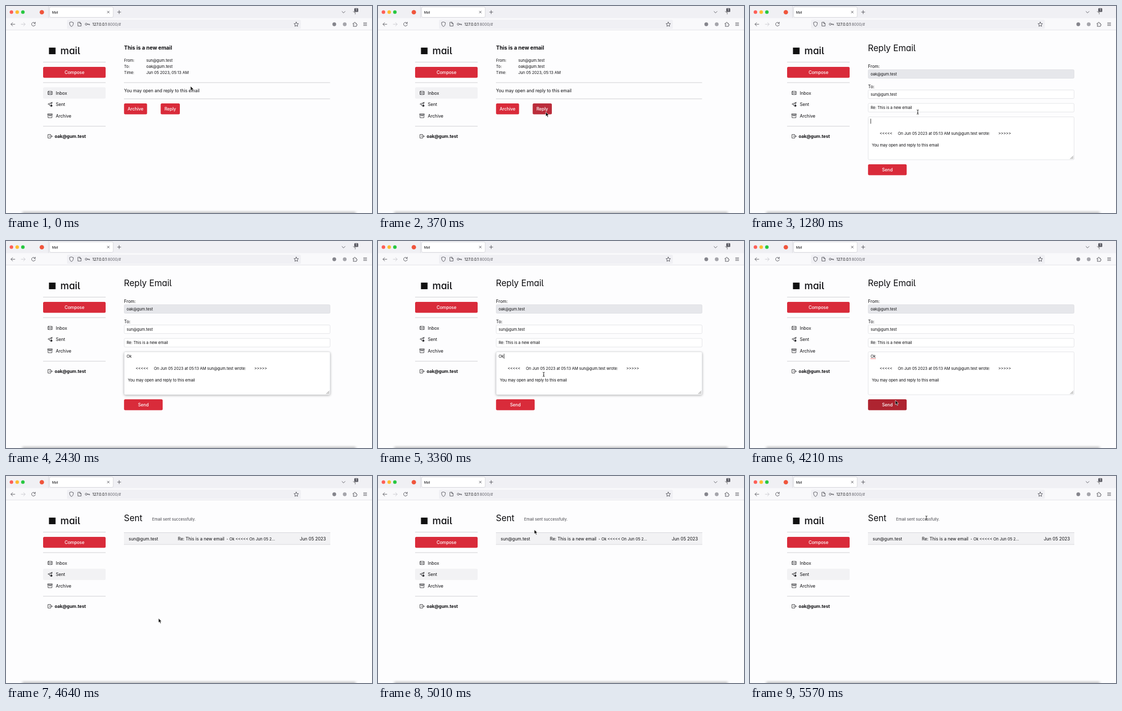
An HTML page for the animation above (5.59 s loop, 720 by 408 pixels).

```html
<!DOCTYPE html>
<html lang="en">
<head>
<meta charset="utf-8">
<title>Mail</title>
<style>
  html, body { margin: 0; width: 100%; height: 100%; overflow: hidden; background: #fdfdfe; }
  svg { display: block; width: 100vw; height: 100vh; }
  text { font: 400 8.55px Inter, sans-serif; fill: #0c0c0f; white-space: pre; }
  .small { font-size: 7.6px; }
  .bold { font-weight: 700; }
  .heading { font-size: 17px; font-feature-settings: "cv11", "cv05"; }
  .logo { font-size: 19px; font-weight: 500; font-feature-settings: "cv11", "cv05"; }
  .label { fill: #fff; font-weight: 500; text-anchor: middle; }
  .button { fill: #d92b3a; }
  .rule { stroke: #cdcdd1; fill: none; }
  .icon { stroke: #4a4a52; fill: none; stroke-width: .9; stroke-linecap: round; stroke-linejoin: round; }
  .dark { stroke: #17171b; stroke-width: .8; }
  .field { fill: #fff; stroke: #dcdde1; stroke-width: .8; }
  .selected { fill: #f2f2f4; }
</style>
</head>
<body>
<svg viewBox="0 0 720 408">
  <defs>
    <filter id="blur" x="-10%" y="-50%" width="120%" height="200%"><feGaussianBlur stdDeviation="2.8"/></filter>
  </defs>
  <rect width="720" height="408" fill="#fdfdfe"/>

  <!-- Browser window -->
  <rect width="720" height="24" fill="#f0f0f4"/>
  <rect y="24" width="720" height="23" fill="#f9f9fb"/>
  <path d="M0 47.3H720" stroke="#dedee2" stroke-width=".8"/>
  <circle cx="10.7" cy="12" r="3.5" fill="#fe5f57"/>
  <circle cx="22" cy="12" r="3.5" fill="#febc2e"/>
  <circle cx="33.2" cy="12" r="3.5" fill="#28c840"/>
  <circle cx="70.5" cy="12.2" r="4.3" fill="#f0553c"/>
  <path d="M83.5 0V23.5" stroke="#d5d5da" stroke-width=".7"/>
  <rect x="85.7" y="1.8" width="125.2" height="20.6" rx="2.5" fill="#fff" stroke="#c9c9d0" stroke-width=".7"/>
  <text x="90.5" y="14.6" style="font-size:6.2px">Mail</text>
  <rect x="120" y="27" width="460" height="18" rx="2.5" fill="#f0f0f4"/>
  <g class="icon">
    <path d="M199.3 10l4 4m0-4l-4 4M219.3 12h6.6m-3.3-3.3v6.6M661 10.7l3 3 3-3"/>
    <path d="M17.5 36H9.8m3.2-3.3L9.7 36l3.3 3.3"/>
    <path d="M30 36h7.7m-3.2-3.3l3.3 3.3-3.3 3.3" stroke="#c4c4ca"/>
    <path d="M57.2 33.8a3.7 3.7 0 1 0 .5 3M57.6 31.8v2.6H55"/>
    <path d="M128.8 31.5l3.7 1.3c0 4-.8 6.2-3.7 7.7-2.9-1.5-3.7-3.7-3.7-7.7z"/>
    <path d="M141.8 32h3.6l2.4 2.4v5.1h-6zM145.2 32v2.6h2.6"/>
    <circle cx="157.8" cy="35.8" r="2"/><path d="M160 35.8h4.4v1.8m-2-1.8v1.3"/>
    <path d="M571 31.7l1.3 2.8 3.1.4-2.3 2.1.6 3.1-2.7-1.5-2.7 1.5.6-3.1-2.3-2.1 3.1-.4z"/>
    <path d="M683.2 34h1.8c-.7-2.6 3-2.6 2.3 0h2v2.2c2.3-.6 2.3 2.6 0 2v2h-6.1v-2c2 .4 2-2.5 0-2z"/>
    <path d="M703.3 33.2h6.4m-6.4 2.6h6.4m-6.4 2.6h6.4"/>
    <path d="M683 10.5q1 2.5 4 2v3.5" stroke="#666"/>
  </g>
  <circle cx="645.8" cy="36" r="3.7" fill="#85858c"/>
  <circle cx="666.3" cy="36" r="3.7" fill="#a5a5ab"/>
  <rect x="685" y="4.2" width="8" height="7.6" rx="1.5" fill="#606068"/>
  <text x="689" y="10.2" text-anchor="middle" style="font-size:6px;fill:#fff">1</text>
  <text x="170" y="38.8" style="font-size:7.4px">127.0.0.1<tspan fill="#62626a">:8000/#</tspan></text>

  <!-- Sidebar -->
  <rect x="84.5" y="82" width="13" height="13" fill="#111"/>
  <text class="logo" x="107" y="94.5">mail</text>
  <path class="rule" d="M73 110.7H196M73 151H196M73 237H196"/>
  <rect class="button" x="73" y="120" width="123" height="21.5" rx="2.5"/>
  <text class="label" x="134.7" y="134">Compose</text>
  <rect id="selection" class="selected" x="73" y="160.3" width="123" height="22.2" rx="2.5"/>
  <text x="98" y="174.6">Inbox</text>
  <text x="98" y="197.2">Sent</text>
  <text x="98" y="219.7">Archive</text>
  <text class="bold" x="95.7" y="259.8">oak@gum.test</text>
  <g class="icon dark">
    <rect x="82.5" y="168.2" width="8.4" height="6.4" rx="1"/>
    <path d="M82.7 169.3l4 2.6 4-2.6M82.8 174.2l2.8-2.8m5 2.8l-2.8-2.8"/>
    <path d="M87 197.2l-1.5-2.5-2.9-1.4 8.3-3.5-1.5 4.3M85.5 194.7l5.1-4.7"/>
    <circle cx="89.3" cy="196.6" r="1.5" fill="#17171b"/>
    <path d="M82.4 212.5h8.6v2.2h-8.6zM83.1 214.7h7.2v5.5h-7.2zM85.5 216.5h2.4"/>
    <path d="M88 255v-1.7h-5.5v7H88v-1.7M85.3 256.8h5.6m-1.7-1.7l1.7 1.7-1.7 1.7"/>
  </g>

  <!-- Opened email -->
  <g id="reading">
    <text class="bold" x="232.3" y="85.6" style="font-size:10.3px">This is a new email</text>
    <g class="small">
      <text class="small" x="232.3" y="110.3">From:</text><text class="small" x="276" y="110.3">sun@gum.test</text>
      <text class="small" x="232.3" y="122.2">To:</text><text class="small" x="276" y="122.2">oak@gum.test</text>
      <text class="small" x="232.3" y="134.2">Time:</text><text class="small" x="276" y="134.2">Jun 05 2023, 05:13 AM</text>
    </g>
    <path class="rule" d="M232 151H637.5M232 183H637.5"/>
    <text x="232.3" y="170">You may open and reply to this email</text>
    <rect class="button" x="232.2" y="192" width="45.3" height="21.5" rx="2.5"/>
    <text class="label" x="254.8" y="206">Archive</text>
    <rect id="reply" class="button" x="304.3" y="192" width="37.7" height="21.5" rx="2.5"/>
    <text class="label" x="323.1" y="206">Reply</text>
  </g>

  <!-- Reply form -->
  <g id="writing">
    <text class="heading" x="232" y="89.3">Reply Email</text>
    <text x="232.3" y="121.6">From:</text>
    <rect class="field" x="232.5" y="125.5" width="405" height="17" rx="2" style="fill:#e6e7eb"/>
    <text class="small" x="237.2" y="136.8">oak@gum.test</text>
    <text x="232.3" y="161.6">To:</text>
    <rect class="field" x="232.5" y="165.5" width="405" height="17" rx="2"/>
    <text class="small" x="237.2" y="176.8">sun@gum.test</text>
    <rect class="field" x="232.5" y="192" width="405" height="17" rx="2"/>
    <text class="small" x="237.2" y="203.3">Re: This is a new email</text>
    <rect id="glow" x="232.5" y="220" width="405" height="84" rx="2" opacity="0" filter="url(#blur)"/>
    <rect class="field" x="232.5" y="218.5" width="405" height="84.5" rx="2"/>
    <text id="typed" class="small" x="237.2" y="229.9"></text>
    <path id="squiggle" d="M237.5 231.8H248" stroke="#d33" stroke-width="1.2" stroke-dasharray="1.2 .9"/>
    <path id="caret" stroke="#000" stroke-width=".8"/>
    <text class="small" x="255" y="253.6">&lt;&lt;&lt;&lt;&lt;</text>
    <text class="small" x="291" y="253.6">On Jun 05 2023 at 05:13 AM sun@gum.test wrote:</text>
    <text class="small" x="488.5" y="253.6">&gt;&gt;&gt;&gt;&gt;</text>
    <text class="small" x="239.7" y="277.2">You may open and reply to this email</text>
    <path d="M630 301.5l6-6m-3.4 6l3.4-3.4m-1 3.4l1-1" stroke="#666" stroke-width=".8"/>
    <rect id="send" class="button" x="232.2" y="312" width="76" height="21.5" rx="2.5"/>
    <text class="label" x="270.2" y="326">Send</text>
  </g>

  <!-- Sent list -->
  <g id="sent">
    <text class="heading" x="232" y="89.3">Sent</text>
    <text class="small" x="287.5" y="88" style="fill:#45454b">Email sent successfully.</text>
    <rect class="selected" x="232" y="111.5" width="406" height="23.5"/>
    <path class="rule" d="M232 111.6H638M232 135H638" stroke-width=".8"/>
    <text x="241.2" y="126.9">sun@gum.test</text>
    <text x="338" y="126.9">Re: This is a new email</text>
    <text class="small" x="433.8" y="126.9">- Ok &lt;&lt;&lt;&lt;&lt; On Jun 05 2...</text>
    <text x="629.3" y="126.9" text-anchor="end">Jun 05 2023</text>
  </g>

  <rect x="32" y="406" width="656" height="8" fill="#999" opacity=".7" filter="url(#blur)"/>

  <g id="cursor">
    <path id="arrow" d="M0 0V8.6L2 6.8 3.5 10.2 5 9.5 3.6 6.3H6.2Z" stroke="#fff" stroke-width=".7"/>
    <g id="beam" fill="none">
      <path d="M-2-4.2Q0-4.2 0-3V3Q0 4.2-2 4.2M2-4.2Q0-4.2 0-3M0 3Q0 4.2 2 4.2" stroke="#fff" stroke-width="1.8"/>
      <path d="M-2-4.2Q0-4.2 0-3V3Q0 4.2-2 4.2M2-4.2Q0-4.2 0-3M0 3Q0 4.2 2 4.2M-1 1.2H1" stroke="#111" stroke-width=".9"/>
    </g>
  </g>
</svg>
<script>
const LOOP = 5590, OPEN_REPLY = 1270, OPEN_SENT = 4280;
const RED = [217, 43, 58], HOVER = [187, 45, 59], PRESSED = [174, 36, 48];

// time, x, y
const route = [
  [30, 363, 158], [370, 330, 209], [1310, 330, 209], [1630, 344, 317],
  [1710, 344, 317], [2240, 329, 286], [2430, 329, 286], [2990, 333, 289],
  [3360, 326, 263], [3520, 319, 252], [3550, 319, 252], [4080, 286, 314],
  [4530, 286, 314], [4640, 300, 281], [5040, 308, 92], [5090, 308, 92],
  [5170, 308, 82], [5310, 308, 82], [5570, 347, 83]
];

const el = id => document.getElementById(id);
const show = (id, on) => el(id).style.display = on ? "" : "none";
const between = (t, a, b) => t >= a && t < b;
const ramp = (t, a, b) => Math.min(1, Math.max(0, (t - a) / (b - a)));
const mix = (a, b, k) => a.map((v, i) => v + (b[i] - v) * k);

function pointerAt(t) {
  const next = route.findIndex(p => p[0] > t);
  if (next === 0) return route[0].slice(1);
  if (next < 0) return route.at(-1).slice(1);
  const a = route[next - 1], b = route[next];
  return mix(a.slice(1), b.slice(1), ramp(t, a[0], b[0]));
}

function paintButton(id, t, hoverAt, pressAt) {
  const hovered = mix(RED, HOVER, ramp(t, hoverAt, hoverAt + 120));
  el(id).style.fill = `rgb(${mix(hovered, PRESSED, ramp(t, pressAt, pressAt + 90))})`;
}

function draw(t) {
  const writing = between(t, OPEN_REPLY, OPEN_SENT), sent = t >= OPEN_SENT;
  show("reading", t < OPEN_REPLY);
  show("writing", writing);
  show("sent", sent);
  show("selection", !writing);
  el("selection").setAttribute("y", sent ? 182.8 : 160.3);

  paintButton("reply", t, 240, 1090);
  paintButton("send", t, 3950, 4110);

  const letters = t < 1710 ? 0 : t < 1840 ? 1 : 2;
  el("typed").textContent = "Ok".slice(0, letters);
  el("caret").setAttribute("d", `M${[237.6, 243.6, 248][letters]} 222.2V232`);
  show("caret", t < 2430 || between(t, 2990, 3550));
  show("squiggle", t >= 4110);
  el("glow").setAttribute("opacity", .36 * (ramp(t, 1310, 1460) - ramp(t, 4110, 4200)));

  const [x, y] = pointerAt(t);
  const beam = writing && y < 303 || t > 5340;
  el("cursor").setAttribute("transform", `translate(${x} ${y})`);
  show("cursor", !between(t, 1710, 2240) && !between(t, 2430, 2990));
  show("arrow", !beam);
  show("beam", beam);
}

const start = performance.now();
function tick() {
  draw((performance.now() - start) % LOOP);
  requestAnimationFrame(tick);
}
tick();
</script>
</body>
</html>
```
